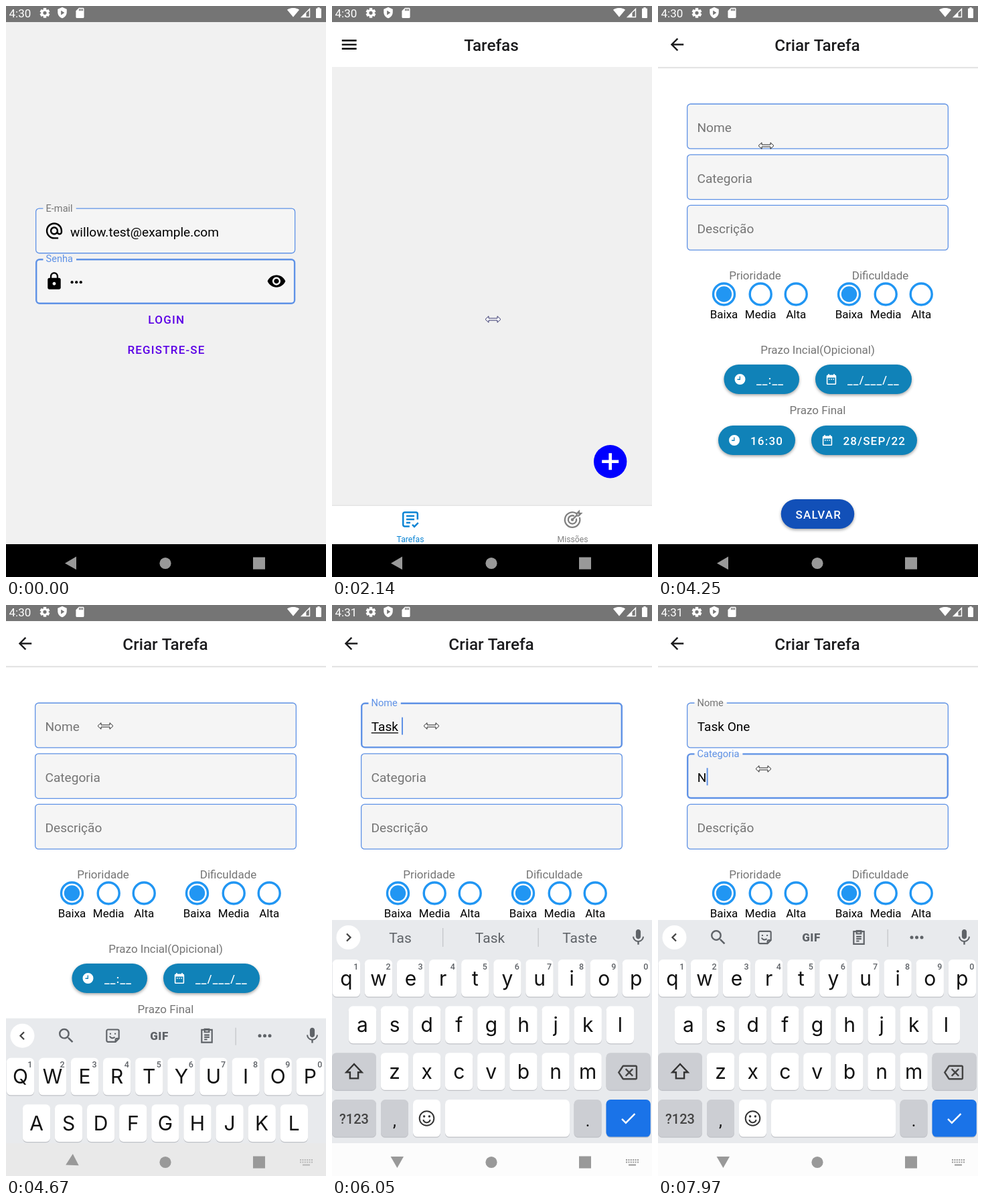
These frames come from a looping animation (478 by 852 pixels, 8 s). An HTML page with a canvas:

```html
<!DOCTYPE html>
<html lang="pt">
<head>
<meta charset="utf-8">
<title>Tarefas</title>
<style>
html, body { margin: 0; width: 100%; height: 100%; overflow: hidden; background: #f1f1f1; }
canvas { display: block; }
</style>
</head>
<body>
<canvas id="stage" width="478" height="852"></canvas>
<script>
const ctx = document.getElementById('stage').getContext('2d');
const LOOP = 8000, DP = 1.216, BODY = 19.1;
const BLUE = '#5f92e6', GRAY = '#757575', KEY_GRAY = '#5f6368';
const SWAP = 3654; // list screen gives way to the form

// Icons on a 24-unit grid
const ICONS = {
  at: 'M12 1.95c-5.52 0-10 4.48-10 10s4.48 10 10 10h5v-2h-5c-4.34 0-8-3.66-8-8s3.66-8 8-8 8 3.66 8 8v1.43c0 .79-.71 1.57-1.5 1.57s-1.5-.78-1.5-1.57v-1.43c0-2.76-2.24-5-5-5s-5 2.24-5 5 2.24 5 5 5c1.38 0 2.64-.56 3.54-1.47.65.89 1.77 1.47 2.96 1.47 1.97 0 3.5-1.6 3.5-3.57v-1.43c0-5.52-4.48-10-10-10zm0 13c-1.66 0-3-1.34-3-3s1.34-3 3-3 3 1.34 3 3-1.34 3-3 3z',
  lock: 'M18 8h-1V6c0-2.76-2.24-5-5-5S7 3.24 7 6v2H6c-1.1 0-2 .9-2 2v10c0 1.1.9 2 2 2h12c1.1 0 2-.9 2-2V10c0-1.1-.9-2-2-2zm-6 9c-1.1 0-2-.9-2-2s.9-2 2-2 2 .9 2 2-.9 2-2 2zm3.1-9H8.9V6c0-1.71 1.39-3.1 3.1-3.1s3.1 1.39 3.1 3.1v2z',
  eye: 'M12 4.5C7 4.5 2.73 7.61 1 12c1.73 4.39 6 7.5 11 7.5s9.27-3.11 11-7.5c-1.73-4.39-6-7.5-11-7.5zM12 17c-2.76 0-5-2.24-5-5s2.24-5 5-5 5 2.24 5 5-2.24 5-5 5zm0-8c-1.66 0-3 1.34-3 3s1.34 3 3 3 3-1.34 3-3-1.34-3-3-3z',
  back: 'M20 11H7.83l5.59-5.59L12 4l-8 8 8 8 1.41-1.41L7.83 13H20z',
  menu: 'M3 6h18v2H3zM3 11h18v2H3zM3 16h18v2H3z',
  shield: 'M12 1 3 5v6c0 5.55 3.84 10.74 9 12 5.16-1.26 9-6.45 9-12V5zM9.5 7.5v9l7-4.5z',
  card: 'M18 2h-8L4 8v12c0 1.1.9 2 2 2h12c1.1 0 2-.9 2-2V4c0-1.1-.9-2-2-2zM10 4h2v4h-2zM13 4h2v4h-2zM16 4h2v4h-2z',
  wifi: 'M12 21 24 6.5C23 5.7 18.9 3 12 3S1 5.7 0 6.5z',
  signal: 'M2 22h20V2zM14 12.5 20 7v13h-6z',
  battery: 'M15.67 4H14V2h-4v2H8.33C7.6 4 7 4.6 7 5.33v15.33C7 21.4 7.6 22 8.33 22h7.33c.74 0 1.34-.6 1.34-1.33V5.33C17 4.6 16.4 4 15.67 4z',
  clock: 'M12 2a10 10 0 1 0 0 20 10 10 0 0 0 0-20zM12.6 6.5v6.6H7v-1.6h4V6.5z',
  calendar: 'M19 4h-1V2h-2v2H8V2H6v2H5a2 2 0 0 0-2 2v14a2 2 0 0 0 2 2h14a2 2 0 0 0 2-2V6a2 2 0 0 0-2-2zM19 20H5V9h14zM7 11h2v2H7zM11 11h2v2h-2zM15 11h2v2h-2z',
  search: 'M15.5 14h-.79l-.28-.27A6.47 6.47 0 0 0 16 9.5 6.5 6.5 0 1 0 9.5 16c1.61 0 3.09-.59 4.23-1.57l.27.28v.79l5 4.99L20.49 19zm-6 0C7.01 14 5 11.99 5 9.5S7.01 5 9.5 5 14 7.01 14 9.5 11.99 14 9.5 14z',
  mic: 'M12 14c1.66 0 3-1.34 3-3V5c0-1.66-1.34-3-3-3S9 3.34 9 5v6c0 1.66 1.34 3 3 3zm5.3-3c0 3-2.54 5.1-5.3 5.1S6.7 14 6.7 11H5c0 3.41 2.72 6.23 6 6.72V21h2v-3.28c3.28-.48 6-3.3 6-6.72z',
  erase: 'M22 3H7c-.69 0-1.23.35-1.59.88L0 12l5.41 8.11c.36.53.9.89 1.59.89h15c1.1 0 2-.9 2-2V5c0-1.1-.9-2-2-2zm0 16H7.07L2.4 12l4.66-7H22zm-11.59-2L14 13.41 17.59 17 19 15.59 15.41 12 19 8.41 17.59 7 14 10.59 10.41 7 9 8.41 12.59 12 9 15.59z',
  check: 'M9 16.17 4.83 12l-1.42 1.41L9 19 21 7l-1.41-1.41z',
  shift: 'M12 3 2.5 13H7v7.5h10V13h4.5z',
  tasks: 'M11 20.5H5a2 2 0 0 1-2-2V5a2 2 0 0 1 2-2h14a2 2 0 0 1 2 2v7M7 7.5h10M7 11.8h10M7 16h5M14.5 18.3l2.5 2.5 4.8-4.8',
  target: 'M17.3 3.4A10.2 10.2 0 1 0 21.7 8.8M14.6 7A5.6 5.6 0 1 0 17.4 10.4M12 12l6-6V3.8l3-3v2.8h2.6l-3 3H18M11 12a1 1 0 1 0 2 0 1 1 0 1 0-2 0',
  sticker: 'M16 21H5a2 2 0 0 1-2-2V5a2 2 0 0 1 2-2h14a2 2 0 0 1 2 2v11zv-3a2 2 0 0 1 2-2h3M8.5 8v2M15.5 8v2M7.5 12.5c1 3 5 4 7.5 1.5',
  clip: 'M5 4h14v17H5zM9 3h6v4H9zM8.5 11h7M8.5 14h7M8.5 17h4',
  arrow: 'M-11.5 0l5-4.7v3.2h13V-4.7l5 4.7-5 4.7V1.5h-13V4.7z'
};
for (const k in ICONS) ICONS[k] = new Path2D(ICONS[k]);

const clamp = v => Math.max(0, Math.min(1, v));
const ramp = (t, a, b) => clamp((t - a) / (b - a));
const lerp = (a, b, p) => a + (b - a) * p;
const easeOut = p => 1 - (1 - p) ** 3;

function bezier(x, x1, y1, x2, y2) {
  const f = (s, a, b) => 3 * s * (1 - s) ** 2 * a + 3 * s * s * (1 - s) * b + s ** 3;
  let lo = 0, hi = 1;
  for (let i = 0; i < 20; i++) {
    const m = (lo + hi) / 2;
    if (f(m, x1, x2) < x) lo = m; else hi = m;
  }
  return f(lo, y1, y2);
}
const screenEase = p => p < 1 / 6
  ? 0.4 * bezier(p * 6, 0.3, 0, 0.8, 0.15)
  : 0.4 + 0.6 * bezier((p - 1 / 6) * 1.2, 0.05, 0.7, 0.1, 1);

function latest(list, t) {
  let value = list[0][1];
  for (const [at, v] of list) if (t >= at) value = v;
  return value;
}

function box(x, y, w, h, color) {
  ctx.fillStyle = color;
  ctx.fillRect(x, y, w, h);
}
function round(x, y, w, h, r, color) {
  ctx.beginPath();
  ctx.roundRect(x, y, w, h, r);
  ctx.fillStyle = color;
  ctx.fill();
}
function disc(x, y, r, color) {
  ctx.beginPath();
  ctx.arc(x, y, r, 0, 7);
  ctx.fillStyle = color;
  ctx.fill();
}
function ring(x, y, r, color, width) {
  ctx.beginPath();
  ctx.arc(x, y, r, 0, 7);
  ctx.strokeStyle = color;
  ctx.lineWidth = width;
  ctx.stroke();
}
function setFont(size, weight = 400, family = 'Roboto') {
  ctx.font = `${weight} ${size}px ${family}, sans-serif`;
}
function measure(s, size) {
  setFont(size);
  return ctx.measureText(s).width;
}
function text(s, x, y, size, color, align = 'left', weight = 400, spacing = 0, family) {
  setFont(size, weight, family);
  ctx.letterSpacing = spacing + 'px';
  ctx.textAlign = align;
  ctx.fillStyle = color;
  ctx.fillText(s, x, y);
  ctx.letterSpacing = '0px';
}
function icon(name, x, y, color, scale = DP, line = 0) {
  ctx.save();
  ctx.translate(x, y);
  ctx.scale(scale, scale);
  ctx.translate(-12, -12);
  ctx.fillStyle = ctx.strokeStyle = color;
  ctx.lineWidth = line;
  if (line) ctx.stroke(ICONS[name]); else ctx.fill(ICONS[name], 'evenodd');
  ctx.restore();
}
function scaled(s, draw) {
  ctx.save();
  ctx.beginPath();
  ctx.rect(0, 24, 478, 779);
  ctx.clip();
  ctx.translate(239, 413);
  ctx.scale(s, s);
  ctx.translate(-239, -413);
  draw();
  ctx.restore();
}

function statusBar(t) {
  box(0, 0, 478, 24, '#757575');
  text(t < 5570 ? '4:30' : '4:31', 4.5, 16.8, 17, '#fff');
  for (let i = 0; i < 3; i++) {
    ctx.save();
    ctx.translate(58, 10.3);
    ctx.rotate(i * Math.PI / 3);
    box(-2.2, -7.4, 4.4, 14.8, '#fff');
    ctx.restore();
  }
  disc(58, 10.3, 5.6, '#fff');
  disc(58, 10.3, 2.6, '#757575');
  icon('shield', 84, 10, '#fff', 0.75);
  icon('card', 110.5, 10.3, '#fff', 0.76);
  icon('wifi', 429, 9.8, '#fff', 0.75);
  icon('signal', 447, 10, '#fff', 0.72);
  icon('battery', 467, 10, '#fff', 0.8);
}

function navBar(t) {
  const p = easeOut(ramp(t, 4600, 4860));
  const shade = Math.round(252 * clamp(p * 1.5));
  box(0, 803, 478, 49, `rgb(${shade},${shade},${shade})`);
  ctx.save();
  ctx.translate(97, 831);
  ctx.rotate(-Math.PI / 2 * ramp(t, 4600, 4835));
  ctx.beginPath();
  ctx.moveTo(-9, 0.4);
  ctx.lineTo(8, -9.4);
  ctx.lineTo(8, 10);
  ctx.fillStyle = '#999';
  ctx.fill();
  ctx.restore();
  disc(238, 831.5, 8.6, '#999');
  box(369, 822.5, 18, 18, '#999');
  if (p > 0) {
    ctx.globalAlpha = p;
    for (let r = 0; r < 2; r++)
      for (let c = 0; c < 6; c++) box(439 + c * 3.4, 827 + r * 3.4, 2, 2, '#999');
    box(443, 834.5, 11, 2, '#999');
    ctx.globalAlpha = 1;
  }
}

function field(x, y, w, { label, focus, up = 1 }) {
  const h = 68, line = focus ? 2.4 : 1.3, inset = line / 2;
  const size = lerp(BODY, 14.6, up);
  const gap = (measure(label, size) + 9) * up;
  round(x, y, w, h, 5, '#f5f5f5');
  ctx.save();
  ctx.beginPath();
  ctx.rect(0, 0, 478, 852);
  ctx.rect(x + 11.5, y - 4, gap, 9);
  ctx.clip('evenodd');
  ctx.beginPath();
  ctx.roundRect(x + inset, y + inset, w - line, h - line, 5);
  ctx.strokeStyle = BLUE;
  ctx.lineWidth = line;
  ctx.stroke();
  ctx.restore();
  text(label, x + 15.5, lerp(y + 42.5, y + 5.4, up), size, focus && up > 0 ? BLUE : GRAY);
}

function value(s, y, hint, caret) {
  if (s || hint) text(s || hint, 58.7, y + 42.5, BODY, s ? '#000' : GRAY);
  if (caret) box(59 + measure(s, BODY), y + 22, 2, 26, BLUE);
}

function loginScreen(t) {
  box(0, 24, 478, 780, '#f1f1f1');
  if (t >= 1930) return box(0, 24, 478, 67, '#fff');
  field(44, 301.4, 388.3, { label: 'E-mail' });
  icon('at', 72, 335.5, '#000');
  text('willow.test@example.com', 96, 344, BODY, '#000');
  field(44, 377, 388.3, { label: 'Senha', focus: true });
  icon('lock', 72, 410.6, '#000');
  icon('eye', 404, 410.6, '#000');
  const dots = latest([[0, 3], [400, 4], [550, 5], [690, 6]], t);
  for (let i = 0; i < dots; i++) disc(98.6 + i * 6.6, 412.2, 2.1, '#000');
  if (t >= 330 && t < 1190) box(95.5 + dots * 6.6, 399, 2, 25, BLUE);
  if (t >= 1130) {
    ctx.save();
    ctx.beginPath();
    ctx.roundRect(197, 446, 85, 44, 5);
    ctx.clip();
    ctx.globalAlpha = 0.2 * (1 - ramp(t, 1550, 1900));
    disc(240, 467, lerp(8, 50, easeOut(ramp(t, 1130, 1500))), '#6200ee');
    ctx.restore();
  }
  text('LOGIN', 239.8, 474, 17, '#5b00e6', 'center', 500, 1.2);
  text('REGISTRE-SE', 239.5, 518.6, 17, '#5b00e6', 'center', 500, 1.2);
}

function header(title) {
  box(0, 24, 478, 67, '#fff');
  text(title, 238, 66.6, 24.3, '#1c1c1e', 'center', 500);
}

function listScreen(t) {
  box(0, 24, 478, 780, '#f0f0f0');
  header('Tarefas');
  icon('menu', 25.7, 57.6, '#000');
  box(0, 744.5, 478, 60, '#fff');
  box(0, 744.5, 478, 1.3, '#dedede');
  icon('tasks', 117, 766.3, '#0a84d4', 1.2, 2.1);
  icon('target', 359, 766.5, '#808080', 1.1, 2.1);
  text('Tarefas', 117, 800, 12.2, '#0a84d4', 'center');
  text('Missões', 359.5, 800, 12.2, '#808080', 'center');
  if (t < 2050) return;
  disc(415.7, 679.7, 24.7, '#00f');
  box(403.2, 677.4, 25, 4.6, '#fff');
  box(413.4, 667.2, 4.6, 25, '#fff');
  if (t >= 3150) {
    disc(415.7, 679.7, lerp(30, 44.4, ramp(t, 3150, 3290)), 'rgba(0,0,255,.17)');
  }
}

function pill(x, y, w, color, label, textX, mark) {
  ctx.save();
  ctx.shadowColor = 'rgba(0,0,0,.35)';
  ctx.shadowBlur = 4;
  ctx.shadowOffsetY = 2;
  round(x, y, w, 44, 22, color);
  ctx.restore();
  if (mark) icon(mark, x + 24, y + 22, '#fff', 0.8);
  text(label, textX, y + 28.5, 17, '#fff', 'left', 500, 1.2);
}

function radios(title, titleX, x) {
  text(title, titleX, 407.5, 17, GRAY, 'center');
  [['Baixa', 0], ['Media', 54.7], ['Alta', 107.7]].forEach(([s, dx], i) => {
    ring(x + dx, 430, 16, '#2196f3', 3.4);
    if (!i) disc(x, 430, 11.7, '#2196f3');
    text(s, x + dx, 466, 17, '#000', 'center');
  });
}

const NAME = [[0, ''], [5300, 'T'], [5570, 'Ta'], [5710, 'Tas'], [5850, 'Task'], [5990, 'Task '],
  [6260, 'Task O'], [6400, 'Task On'], [6540, 'Task One']];
const HINTS = [[5300, 'T Te To'], [5640, 'Ta Tá Tanto'], [5780, 'Tas Task Taste'], [6120, 'de e One'],
  [6330, 'O Os Ou'], [6470, 'On One Onde'], [6600, 'One Onde Ones']];
const EDITS = [...NAME.map(n => n[0]), 4690, 7560, 7900];

function formScreen(t) {
  box(0, 24, 478, 780, '#fff');
  header('Criar Tarefa');
  box(0, 91, 478, 1, '#dcdcdc');
  box(0, 92, 478, 1.5, '#eee');
  icon('back', 28.5, 57.5, '#1c1c1e');

  const first = t >= 4690 && t < 7560, second = t >= 7560;
  const name = latest(NAME, t);
  const edited = Math.max(...EDITS.filter(a => a <= t));
  const blink = (t - edited) % 1000 < 600;

  field(43, 145.6, 391, { label: 'Nome', focus: first, up: easeOut(ramp(t, 4690, 4900)) });
  if (t >= 4690) value(name, 145.6, t >= 4760 && 'Nome da Tarefa', first && blink);
  if (first && name) {
    const word = name.trim().length < name.length ? name.trim() : name.split(' ').pop();
    const lead = measure(name.slice(0, name.lastIndexOf(word)), BODY);
    box(58.7 + lead, 190.2, measure(word, BODY), 1.3, '#000');
  }
  field(43, 221.2, 391, { label: 'Categoria', focus: second, up: easeOut(ramp(t, 7630, 7830)) });
  if (second) value(t >= 7900 ? 'N' : '', 221.2, t >= 7700 && 'Categoria da Tarefa', blink);
  field(43, 296.8, 391, { label: 'Descrição', up: 0 });

  radios('Prioridade', 145, 98.5);
  radios('Dificuldade', 332, 285.5);
  text('Prazo Incial(Opicional)', 238.5, 518.5, 17, GRAY, 'center');
  pill(98.5, 535, 112.5, '#1082b8', '__:__', 147, 'clock');
  pill(235, 535, 144, '#1082b8', '__/___/__', 283, 'calendar');
  text('Prazo Final', 238.5, 609.3, 17, GRAY, 'center');
  pill(90, 626, 115, '#1082b8', '16:30', 138, 'clock');
  pill(229, 626, 158, '#1082b8', '28/SEP/22', 276.5, 'calendar');
  pill(183.7, 736, 109.5, '#1250b8', 'SALVAR', 205.5);
}

function key(x, y, w, color) {
  round(x, y + 1.2, w, 55.6, 6.5, '#bfc1c6');
  round(x, y, w, 55.6, 6.5, color);
}

function toolbar(t) {
  const open = t >= 5300 && t < 7560;
  disc(24.5, 496, 18, '#fff');
  const d = open ? 1 : -1;
  ctx.beginPath();
  ctx.moveTo(24.5 - 2.5 * d, 490.5);
  ctx.lineTo(24.5 + 3 * d, 496);
  ctx.lineTo(24.5 - 2.5 * d, 501.5);
  ctx.strokeStyle = '#444';
  ctx.lineWidth = 2.3;
  ctx.stroke();
  icon('mic', 457.5, 496, KEY_GRAY, 1.2);
  if (open) {
    latest(HINTS, t).split(' ').forEach((s, i) => text(s, 102 + 134 * i, 504, 21, KEY_GRAY, 'center'));
    box(165, 482, 1.3, 28, '#c4c6ca');
    box(307.5, 482, 1.3, 28, '#c4c6ca');
    return;
  }
  icon('search', 90, 496, KEY_GRAY, 1.22);
  icon('sticker', 159.5, 496, KEY_GRAY, 1.02, 2.1);
  text('GIF', 229, 502, 17, KEY_GRAY, 'center', 900, 0.5);
  icon('clip', 300, 496, KEY_GRAY, 1.1, 2);
  box(342.5, 484, 1.3, 26, '#c4c6ca');
  for (let i = -1; i < 2; i++) disc(386.5 + i * 7.5, 496, 2.5, KEY_GRAY);
}

function keyboard(t) {
  if (t < 4600) return;
  const caps = t < 5340 || (t >= 7630 && t < 7940);
  ctx.save();
  ctx.beginPath();
  ctx.rect(0, 24, 478, 780);
  ctx.clip();
  ctx.translate(0, 382 * (1 - ramp(t, 4600, 4860)) ** 3);
  box(0, 470, 478, 340, '#e8eaed');
  toolbar(t);
  [['qwertyuiop', 21.4], ['asdfghjkl', 45.5], ['zxcvbnm', 93.5]].forEach(([row, left], r) => {
    const y = 529 + r * 69.6;
    [...row].forEach((c, i) => {
      const x = left + i * 48.1;
      key(x - 20.7, y, 41.4, '#fff');
      text(caps ? c.toUpperCase() : c, x, y + 38.5, 30, '#111', 'center', 400, 0, 'Inter');
      if (!r) text((i + 1) % 10, x + 14.5, y + 14.5, 12.5, KEY_GRAY, 'center', 500);
    });
  });
  const dark = '#ccced3';
  key(0, 668.2, 66, dark);
  icon('shift', 33, 696, '#333', 1.22, caps ? 0 : 2);
  key(409.5, 668.2, 66.3, dark);
  icon('erase', 441.5, 697.5, '#444', 1.22);
  key(0, 738, 66, dark);
  text('?123', 33, 774, 20, '#444', 'center', 500);
  key(73, 738, 41, dark);
  text(',', 93.5, 778, 25, '#111', 'center');
  key(121, 738, 41, '#fff');
  ring(141.5, 766, 10.8, '#333', 2);
  disc(137.6, 763, 1.7, '#333');
  disc(145.4, 763, 1.7, '#333');
  ctx.beginPath();
  ctx.arc(141.5, 767, 5.3, 0.2, Math.PI - 0.2);
  ctx.stroke();
  key(169, 738, 186, '#fff');
  key(361.5, 738, 41, dark);
  text('.', 382, 778, 25, '#111', 'center');
  key(409.5, 738, 66.3, '#1a73e8');
  icon('check', 442.5, 766, '#fff', 1.2);
  ctx.restore();
}

// time, x, y
const PATH = [[760, 420, 795], [1090, 240.5, 467.5], [2560, 240.5, 467.5], [2670, 297, 514], [2810, 387, 604],
  [2950, 416, 677], [3520, 416, 677], [3620, 362, 662], [3690, 289.5, 613.5], [3800, 225, 500],
  [4000, 168, 270], [4200, 161.5, 208.5], [4370, 161.5, 208.5], [4530, 148.5, 180.5],
  [6830, 148.5, 180.5], [7100, 157.5, 244.5], [LOOP, 157.5, 244.5]];

function pointer(t) {
  const i = PATH.findIndex(p => p[0] > t);
  if (i < 1) return;
  const a = PATH[i - 1], b = PATH[i], p = ramp(t, a[0], b[0]);
  ctx.save();
  ctx.translate(lerp(a[1], b[1], p), lerp(a[2], b[2], p));
  ctx.fillStyle = '#fff';
  ctx.fill(ICONS.arrow);
  ctx.strokeStyle = t < 3000 ? '#30306a' : '#222';
  ctx.lineWidth = 1;
  ctx.stroke(ICONS.arrow);
  ctx.restore();
}

function draw(t) {
  const p = screenEase(ramp(t, SWAP, SWAP + 400));
  if (t < 2140) loginScreen(t);
  if (t >= 2000 && p < 1) {
    ctx.globalAlpha = t < 2070 ? 0.6 : 1;
    scaled(1 + 0.15 * p, () => listScreen(t));
    ctx.globalAlpha = 1;
  }
  if (t >= SWAP + 46) {
    ctx.globalAlpha = ramp(t, SWAP + 46, SWAP + 130);
    scaled(0.85 + 0.15 * p, () => formScreen(t));
    ctx.globalAlpha = 1;
  }
  keyboard(t);
  statusBar(t);
  navBar(t);
  pointer(t);
}

const start = performance.now();
function tick() {
  draw((performance.now() - start) % LOOP);
  requestAnimationFrame(tick);
}
tick();
</script>
</body>
</html>
```
